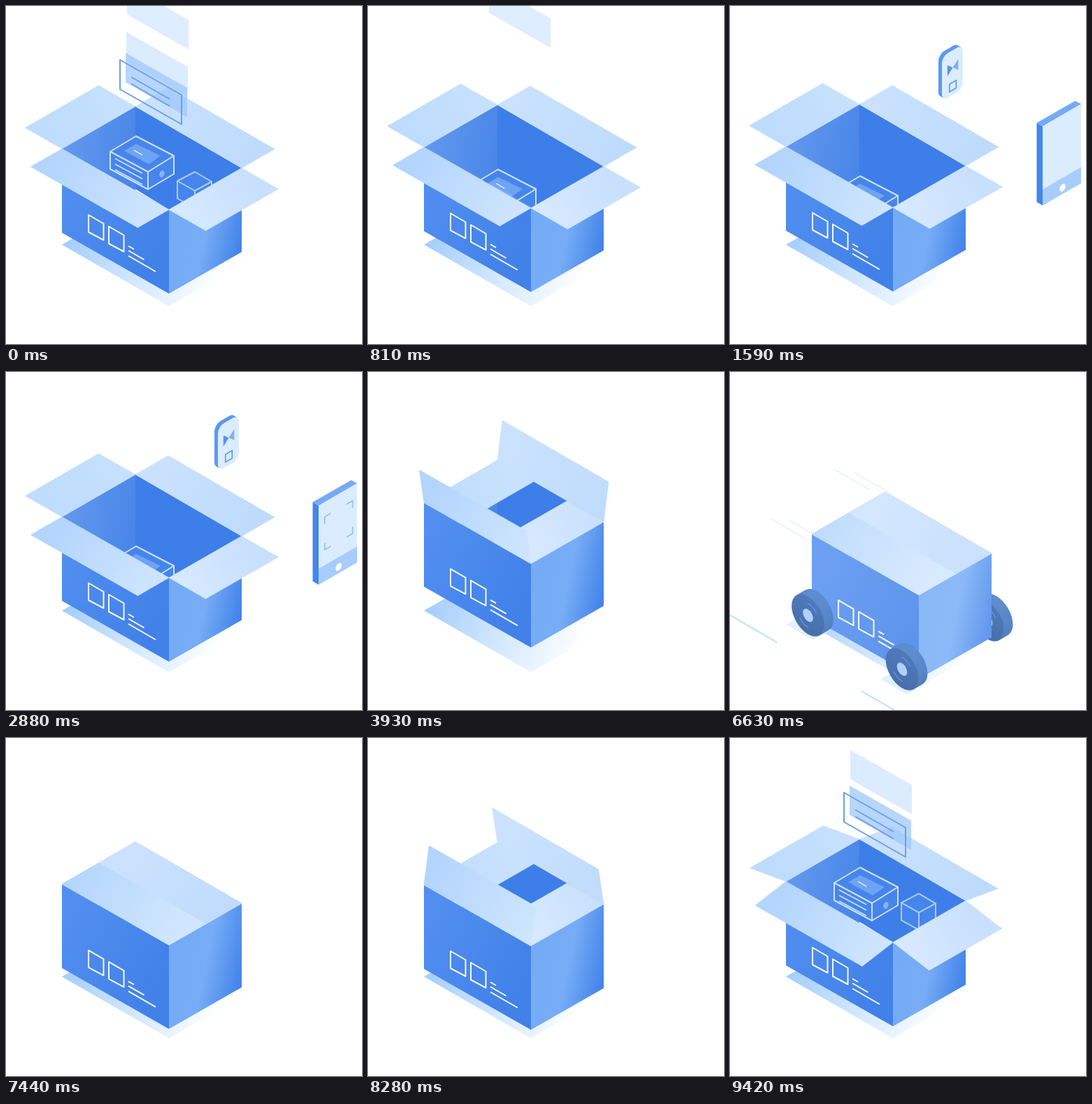
Write an HTML page with a canvas that moves like this. It is 509 by 483 pixels and loops after 9.45 s.

```html
<!DOCTYPE html>
<html lang="en">
<head>
<meta charset="utf-8">
<title>Parcel</title>
<style>
html, body { margin: 0; width: 100%; height: 100%; overflow: hidden; background: #fff; }
canvas { display: block; }
</style>
</head>
<body>
<canvas id="stage" width="509" height="483"></canvas>
<script>
const c = document.getElementById('stage').getContext('2d');
const LOOP = 9450, RENEW = 6900;
const clamp = v => Math.max(0, Math.min(1, v));
const ease = v => v * v * (3 - 2 * v);
const mix = (a, b, p) => a + (b - a) * p;

// Eased value from a list of time, value pairs
function key(t, ...k) {
  for (let i = 0; i < k.length - 2; i += 2)
    if (t < k[i + 2]) return mix(k[i + 1], k[i + 3], ease(clamp((t - k[i]) / (k[i + 2] - k[i]))));
  return k[k.length - 1];
}
function grad(x0, y0, x1, y1, ...cols) {
  const g = c.createLinearGradient(x0, y0, x1, y1);
  cols.forEach((col, i) => g.addColorStop(i / (cols.length - 1), col));
  return g;
}
function paint(fill, stroke, width = 2) {
  if (fill) { c.fillStyle = fill; c.fill(); }
  if (stroke) { c.strokeStyle = stroke; c.lineWidth = width; c.stroke(); }
}
function poly(pts, fill, stroke, width) {
  c.beginPath();
  pts.forEach(p => c.lineTo(...p));
  c.closePath();
  paint(fill, stroke, width);
}
function line(x0, y0, x1, y1, col, width = 2) {
  c.beginPath();
  c.moveTo(x0, y0);
  c.lineTo(x1, y1);
  paint(null, col, width);
}
function disc(x, y, r, fill) {
  c.beginPath();
  c.arc(x, y, r, 0, 7);
  paint(fill);
}
function group(x, y, draw, alpha = 1) {
  if (alpha <= 0) return;
  c.save();
  c.translate(x, y);
  c.globalAlpha *= alpha;
  draw();
  c.restore();
}
const leftPlane = () => c.transform(.866, .5, 0, 1, 0, 0);
const rightPlane = () => c.transform(.866, -.5, 0, 1, 0, 0);

// Box rim corners: left, back, right, front
const L = [80, 210], B = [185, 149.5], R = [337, 237.5], F = [233, 297], H = 120;
const down = (p, d = H) => [p[0], p[1] + d];

function flap(a, b, ox, oy, size, deg, c0, c1) {
  const r = deg * Math.PI / 180, x = ox * Math.cos(r), y = oy * Math.cos(r) - size * Math.sin(r);
  const fill = grad(...a, ...b, c0, c1);
  poly([a, b, [b[0] + x, b[1] + y], [a[0] + x, a[1] + y]], fill, fill, .6);
}
function shortFlap(side, deg) {
  if (side < 0) flap(L, B, -52.5, -30, 60, deg, '#bedcfd', '#c8e1fd');
  else flap(F, R, 52.5, 30, 60, deg, '#d8eaff', '#c8e0fd');
}
function longFlap(side, deg) {
  const s = mix(side > 0 ? 1 : .95, 1.12, Math.max(0, -Math.cos(deg * Math.PI / 180)));
  if (side > 0) flap(B, R, 47 * s, -27 * s, 54 * s, deg, '#cbe2fe', '#bfdbfc');
  else flap(L, F, -47 * s, 27 * s, 54 * s, deg, '#b3d5fc', '#d0e6fe');
}
function faces() {
  poly([L, F, down(F), down(L)], grad(80, 250, 233, 340, '#528ff0', '#4181e8'));
  poly([F, R, down(R), down(F)], grad(233, 325, 335, 345, '#74abf5', '#77adf6', '#4484ea'));
  for (const [x, y] of [[118, 304.5], [147, 321]])
    poly([[x, y], [x + 21.5, y + 12.5], [x + 21.5, y + 36], [x, y + 24.5]], null, '#f4f9ff');
  line(175, 349, 183, 353.5, '#f4f9ff');
  line(175, 355.5, 197.5, 368.5, '#f4f9ff');
  line(175, 363, 214, 385.5, '#f4f9ff');
}

function printer() {
  const ink = '#c9e0fe';
  poly([[149, 208], [186, 186], [240, 214], [240, 240], [203, 262], [149, 233]], '#4685eb', ink);
  poly([[169, 207], [186, 197], [221, 214], [204, 226]], '#6fa4f3');
  line(183, 206, 195, 213, '#d5e8ff', 1.5);
  c.beginPath();
  c.moveTo(149, 208); c.lineTo(203, 237); c.lineTo(240, 214);
  c.moveTo(203, 237); c.lineTo(203, 262);
  paint(null, ink);
  for (let i = 0; i < 3; i++) line(156, 218 + i * 8, 195, 239 + i * 8, ink, 1.7);
  c.beginPath();
  c.ellipse(223, 240, 3.5, 5, .3, 0, 7);
  paint('#86b4f6');
}
function cube() {
  const ink = '#a9ccfb';
  poly([[245, 250], [270, 237], [294, 251], [294, 275], [270, 289], [245, 275]], '#4685eb', ink);
  c.beginPath();
  c.moveTo(245, 250); c.lineTo(270, 264); c.lineTo(294, 251);
  c.moveTo(270, 264); c.lineTo(270, 289);
  paint(null, ink);
}
function sheet(x, y, fill, stroke) {
  poly([[x, y], [x + 88, y + 50], [x + 88, y + 92], [x, y + 42]], fill, stroke);
}
function cards(t) {
  const late = t > RENEW;
  if (late ? t < 8650 : t > 1100) return;
  const fall = late ? key(t, 8650, -190, 9300, 0) : key(t, 0, 0, 900, 185);
  const fade = late ? 1 : 1 - clamp((t - 350) / 500);
  if (!late) group(0, 0, () => sheet(173, -30, '#deedff'), 1 - clamp((t - 960) / 100));
  group(0, fall * (late ? 1.5 : 1.2), () => sheet(172, late ? 16 : 37, '#dcecff'), fade);
  group(0, fall * 1.1, () => sheet(171, 67, '#9fc8fb'), fade * .75);
  group(163, 77 + fall, () => {
    sheet(0, 0, null, '#6d9fe8');
    line(16, 24.5, 71, 56, '#6d9fe8');
    line(16, 34, 71, 66, '#6d9fe8');
  });
}
function contents(t) {
  const late = t > RENEW;
  if (late && t < 8650) return;
  const shown = late ? clamp((t - 8650) / 200) : 1;
  if (late || t < 900)
    group(0, late ? key(t, 8700, -230, 9480, -12) : key(t, 0, 0, 800, 110), cube, shown);
  group(0, late ? key(t, 8650, -200, 9400, -2) : key(t, 0, 0, 1100, 60), printer, shown);
  cards(t);
}

function remote() {
  c.translate(-15, -24);
  const body = fill => { c.beginPath(); c.roundRect(0, 0, 34.6, 64, 10); paint(fill); };
  for (let i = 5; i >= 0; i--)
    group(-i, -i * .6, () => { rightPlane(); body(i ? '#5a99f2' : '#dcecff'); });
  rightPlane();
  poly([[9, 17], [18, 25], [9, 33]], '#5795ee');
  poly([[27, 17], [18, 25], [27, 33]], '#7fb0f5');
  c.strokeStyle = '#5f9bf0';
  c.lineWidth = 2;
  c.strokeRect(12.5, 46, 11, 11);
}
function phone(scan) {
  c.translate(-28, -40);
  poly([[0, 0], [-8.5, -5], [-8.5, 108], [0, 113]], '#4486ea');
  poly([[0, 0], [-8.5, -5], [46.5, -36.5], [55, -32]], '#75abf5');
  rightPlane();
  c.fillStyle = '#dcecff';
  c.fillRect(0, 0, 63.5, 113);
  c.fillStyle = '#a8cdfb';
  c.fillRect(0, 90, 63.5, 23);
  disc(33, 104, 5, '#fff');
  c.globalAlpha *= scan;
  c.beginPath();
  for (const [x, y, sx, sy] of [[10, 21, 1, 1], [56, 21, -1, 1], [56, 68, -1, -1], [10, 68, 1, -1]]) {
    c.moveTo(x + 10 * sx, y);
    c.lineTo(x, y);
    c.lineTo(x, y + 10 * sy);
  }
  paint(null, '#94bff8');
}
// Gadgets hover beside the box, then leap in; "inside" picks the drawing layer
function gadgets(t, inside) {
  if (t < 1050 || t > 3700) return;
  const leap = (start, x, y, tx, rise, draw) => {
    const p = ease(clamp((t - start) / 650));
    if (p >= 1 || (p > .5) !== inside) return;
    group(mix(x, tx, p), mix(y, 345, p) - 4 * rise * p * (1 - p), () => {
      c.scale(1 - .4 * p, 1 - .4 * p);
      draw();
    }, clamp((t - 1050) / 250));
  };
  const ry = key(t, 1050, -50, 1500, 0, 1650, 0, 2880, 6);
  const py = key(t, 1050, -30, 1500, 0, 1650, 0, 2880, 19);
  leap(2950, 475, 212 + py, 245, 160, () => phone(clamp((t - 2200) / 300)));
  leap(2910, 318, 96 + ry, 255, 135, remote);
}

function wheel(x, y, size, spin) {
  group(x, y, () => {
    c.scale(size, size);
    const tread = grad(0, -30, 0, 30, '#4179c8', '#2f62ad');
    for (let i = 13; i >= 0; i--) group(i, -i * .577, () => {
      leftPlane();
      disc(0, 0, 27, i ? tread : grad(0, -27, 0, 27, '#2f62b0', '#285498'));
    });
    leftPlane();
    for (const a of [0, Math.PI]) {
      c.beginPath();
      c.arc(0, 0, 17, spin + a - .5, spin + a + .5);
      paint(null, '#4d89e2', 1.6);
    }
    disc(0, 0, 8.5, '#9fcafa');
  });
}
function road(t) {
  if (t < 4830 || t > 6740) return;
  const move = -.8 * (t - 6630);
  const dash = (x, lane, len, col, w) => line(x, lane + x * .577, x + len, lane + (x + len) * .577, col, w);
  for (const x of [-1230, -700, -350, 0, 188]) dash(x + move, 347.5, 68, '#b5dbff', 2);
  if (t > 6200) for (const [x, lane] of [[58, 176], [85, 163], [178, 41], [150, 53]])
    dash(x + move, lane, 50, '#d6eaff', 1.2);
}

function draw(t) {
  c.globalAlpha = 1;
  c.fillStyle = '#fff';
  c.fillRect(0, 0, 509, 483);
  const late = t > RENEW;
  const bob = late ? key(t, RENEW, -42, 7500, 0, 8400, 0, 9420, -5)
                   : key(t, 0, -6, 1200, -9, 1600, -9, 2880, -3, 3600, 0, 4050, -28, 4450, 0);
  const short = late ? key(t, 8300, 180, 8800, 0, 9420, -10) : key(t, 3450, 0, 3900, 180);
  const long = late ? key(t, 7970, 180, 8660, -10) : key(t, 3650, 0, 4250, 180);
  const size = late ? 0 : key(t, 4150, 0, 4450, 1.1, 4600, 1);
  const drive = late ? 0 : 37 * Math.max(0, t - 5130) / 1500;
  const spin = Math.max(0, t - 4900) * .008 - 2.4;

  // Keeps things in the box from showing below its front rim
  const dropIn = (y, rim, show) => group(0, 0, () => {
    c.beginPath();
    for (const p of [[0, -400], [0, 500], L, F, R, [509, 500], [509, -400]])
      c.lineTo(p[0], p[1] + rim);
    c.clip();
    c.translate(0, y);
    show();
  });

  road(t);
  c.save();
  c.translate(drive, drive * .585);
  poly([down(L, 131), down(F, 132), down(R, 131), down(B, 131)], grad(80, 341, 300, 410, '#a3cdfd', '#d3e8ff', '#fff'));
  if (size > 0) {
    for (const [x, y] of [[67, 346], [202, 424]])
      group(x, y, () => poly([[-24, -7], [0, -20], [38, 2], [14, 15]], '#deedff'), clamp(size));
    wheel(331, 333, size, spin);
  }
  c.translate(0, bob);
  poly([L, B, down(B), F], grad(80, 200, 185, 220, '#6399ee', '#4a86e8'));
  poly([B, R, F, down(B, 118)], '#3e7ee8');
  const shortBack = () => shortFlap(-1, short), longBack = () => longFlap(1, long);
  if (short < 90) shortBack();
  if (long < 90) longBack();
  dropIn(6, 0, () => contents(t));
  dropIn(-bob, 0, () => gadgets(t, true));
  faces();
  if (short >= 90) shortBack();
  shortFlap(1, short);
  if (long >= 90) longBack();
  longFlap(-1, long);
  c.translate(0, -bob);
  if (size > 0) {
    wheel(74.5, 326, size, spin);
    wheel(209, 403, size, spin);
  }
  c.restore();
  gadgets(t, false);

  // White veil while the cart fades and the next box arrives
  const veil = late ? 1 - clamp((t - RENEW) / 400) : clamp((t - 6585) / 300);
  c.fillStyle = `rgba(255,255,255,${veil})`;
  c.fillRect(0, 0, 509, 483);
}

c.lineJoin = 'round';
const begin = performance.now();
function frame() {
  draw((performance.now() - begin) % LOOP);
  requestAnimationFrame(frame);
}
frame();
</script>
</body>
</html>
```
